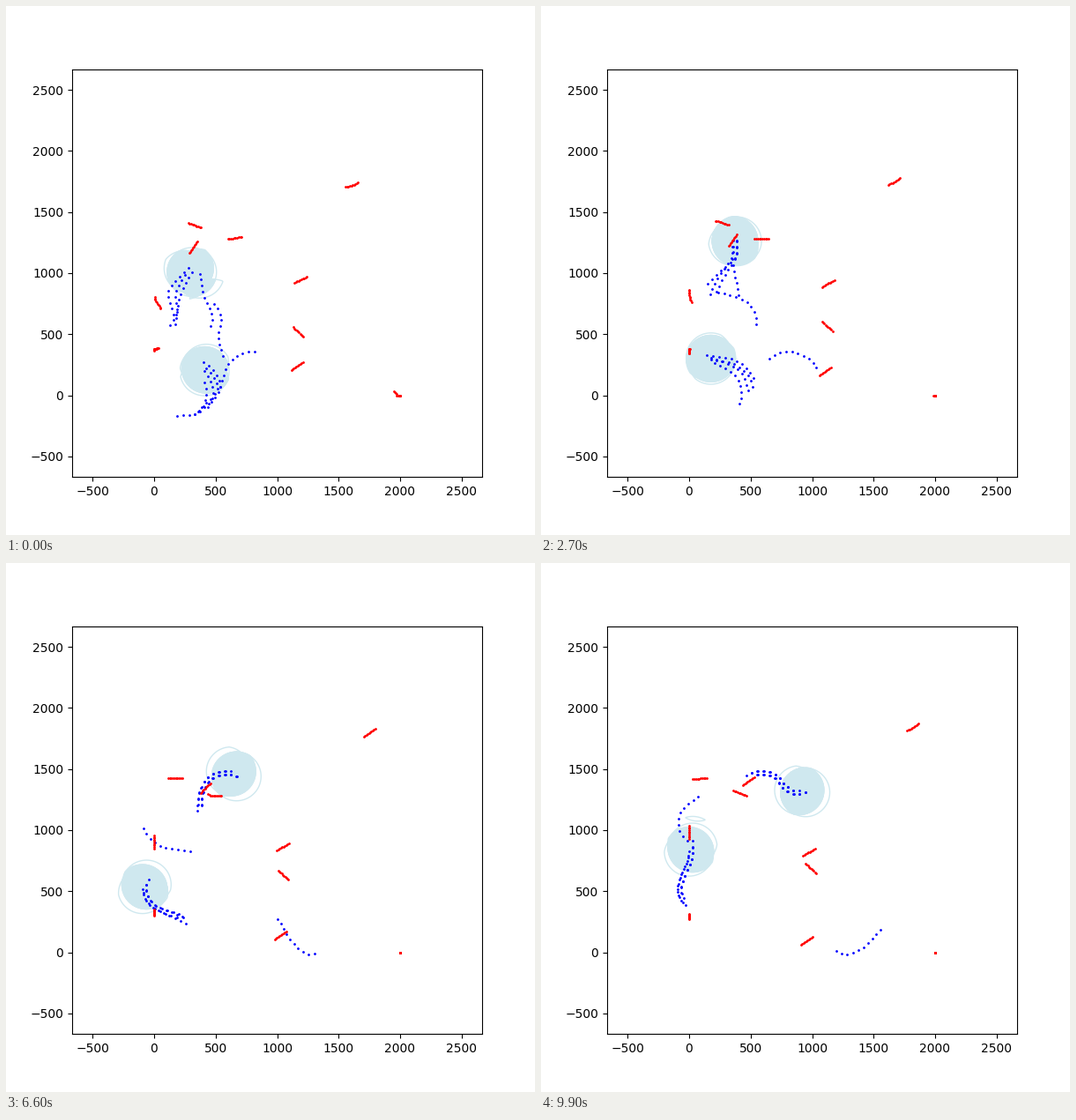
These frames come from a looping animation (600 by 600 pixels, 10000 ms). A matplotlib script:

```python
from itertools import combinations

import matplotlib.pyplot as plt
import numpy as np
from matplotlib.animation import FuncAnimation
from matplotlib.collections import PolyCollection

FRAMES, INTERVAL = 100, 100
TRAIL = 5 * np.arange(10)          # age of the trail dots, in frames
START, END = -TRAIL[-1], FRAMES - 1
RADIUS = 200                       # sensing range of a swimmer
LANE = 15                          # sideways distance from the flock's route
SHADE = "#cfe8ef"
ANGLES = np.linspace(0, 2 * np.pi, 121)
RAYS = np.column_stack([np.cos(ANGLES), np.sin(ANGLES)])


def lengths(p):
    """Distance travelled at each point of a polyline."""
    return np.r_[0, np.hypot(*np.diff(p, axis=0).T).cumsum()]


def smooth(points):
    """Hermite curve through a few points."""
    p = np.array(points, float)
    d = lengths(p)
    slope = np.gradient(p, d, axis=0)
    x = np.linspace(0, d[-1], 800)
    i = np.clip(np.searchsorted(d, x) - 1, 0, len(d) - 2)
    h = (d[i + 1] - d[i])[:, None]
    u = (x - d[i])[:, None] / h
    return ((1 + 2 * u) * (1 - u)**2 * p[i] + u * (1 - u)**2 * h * slope[i]
            + u**2 * (3 - 2 * u) * p[i + 1] - u**2 * (1 - u) * h * slope[i + 1])


def travel(line, lag=0, arrive=END):
    """Constant speed along a line, stopping `lag` short of its end."""
    line = np.array(line, float)
    d = lengths(line)

    def at(t):
        s = np.interp(t, [START, arrive], [0, d[-1] - lag])
        return np.column_stack([np.interp(s, d, axis) for axis in line.T])

    return at


def flock(route, members):
    """Members swim in from their own side, then share two lanes of a route."""
    route = np.array(route, float)
    dx, dy = np.gradient(route, lengths(route), axis=0).T
    right = np.column_stack([dy, -dx])
    return [travel(smooth([*entry, *(route + (-1)**k * LANE * right)]), lag)
            for k, (lag, entry) in enumerate(members)]


upper = flock(
    [(366, 1144), (380, 1296), (444, 1419), (588, 1469),
     (702, 1440), (774, 1354), (853, 1310), (946, 1325)],
    [(0, [(158, 661), (115, 848), (237, 1000)]),
     (50, [(459, 567), (473, 632), (409, 798), (380, 942)]),
     (5, [(172, 582), (208, 798), (272, 950)]),
     (100, [(129, 574), (186, 683), (172, 827), (222, 942)])])

lower = flock(
    [(100, 329), (-29, 401), (-80, 510), (-43, 646), (7, 769), (14, 913)],
    [(0, [(437, -97), (538, 84), (416, 264)]),
     (90, [(358, -133), (516, 76), (423, 221)]),
     (55, [(330, -154), (480, -10), (430, 170)]),
     (120, [(186, -169), (373, -133), (423, 12), (409, 105)])])

loners = [travel(smooth(points)) for points in (
    [(538, 69), (609, 264), (774, 358), (989, 286),
     (1104, 105), (1262, -17), (1398, 26), (1556, 185)],
    [(559, 322), (523, 502), (545, 610), (487, 747), (323, 820),
     (14, 892), (-79, 1000), (-72, 1144), (72, 1274)])]

swimmers = upper + lower + loners

drifters = [travel(points) for points in (
    [(1555, 1705), (1610, 1715), (1700, 1765), (1867, 1873)],
    [(383, 1373), (232, 1425), (32, 1421)],
    [(712, 1297), (625, 1281), (468, 1281), (360, 1325)],
    [(290, 1165), (365, 1285), (425, 1357), (527, 1432)],
    [(53, 710), (8, 785), (0, 830), (0, 1035)],
    [(33, 385), (0, 380), (0, 270)],
    [(1243, 970), (1160, 932), (925, 790)],
    [(1215, 480), (1098, 588), (947, 725)],
    [(1208, 270), (1040, 150), (910, 62)])]
drifters.append(travel([(1950, 32), (1975, 0), (2000, 0)], arrive=-12))


def overlaps(heads, size):
    """Outlines of the areas shared by every group of `size` discs."""
    shapes = []
    for group in combinations(heads, size):
        mid = np.mean(group, axis=0)
        off = mid - np.array(group)
        if (np.hypot(*off.T) >= RADIUS).any():
            continue
        along = RAYS @ off.T
        reach = np.sqrt(along**2 - (off**2).sum(axis=1) + RADIUS**2) - along
        shapes.append(mid + reach.min(axis=1)[:, None] * RAYS)
    return shapes


fig, ax = plt.subplots(figsize=(6, 6), dpi=100)
ax.set_xlim(-2000 / 3, 8000 / 3)
ax.set_ylim(-2000 / 3, 8000 / 3)


def layer(fill, z):
    shapes = PolyCollection([], facecolors=fill, edgecolors=SHADE, linewidths=1, zorder=z)
    return ax.add_collection(shapes, autolim=False)


rings, cores = layer("none", 1), layer(SHADE, 1.1)
blue, = ax.plot([], [], "o", color="blue", ms=1, zorder=2)
red, = ax.plot([], [], "o", color="red", ms=1, zorder=3)


def update(frame):
    t = frame - TRAIL
    trails = [path(t) for path in swimmers]
    heads = [trail[0] for trail in trails]
    rings.set_verts(overlaps(heads, 2))
    cores.set_verts(overlaps(heads, 3))
    blue.set_data(*np.concatenate(trails).T)
    red.set_data(*np.concatenate([path(t) for path in drifters]).T)
    return rings, cores, blue, red


anim = FuncAnimation(fig, update, frames=FRAMES, interval=INTERVAL, repeat=True, repeat_delay=0)
plt.show()
```
